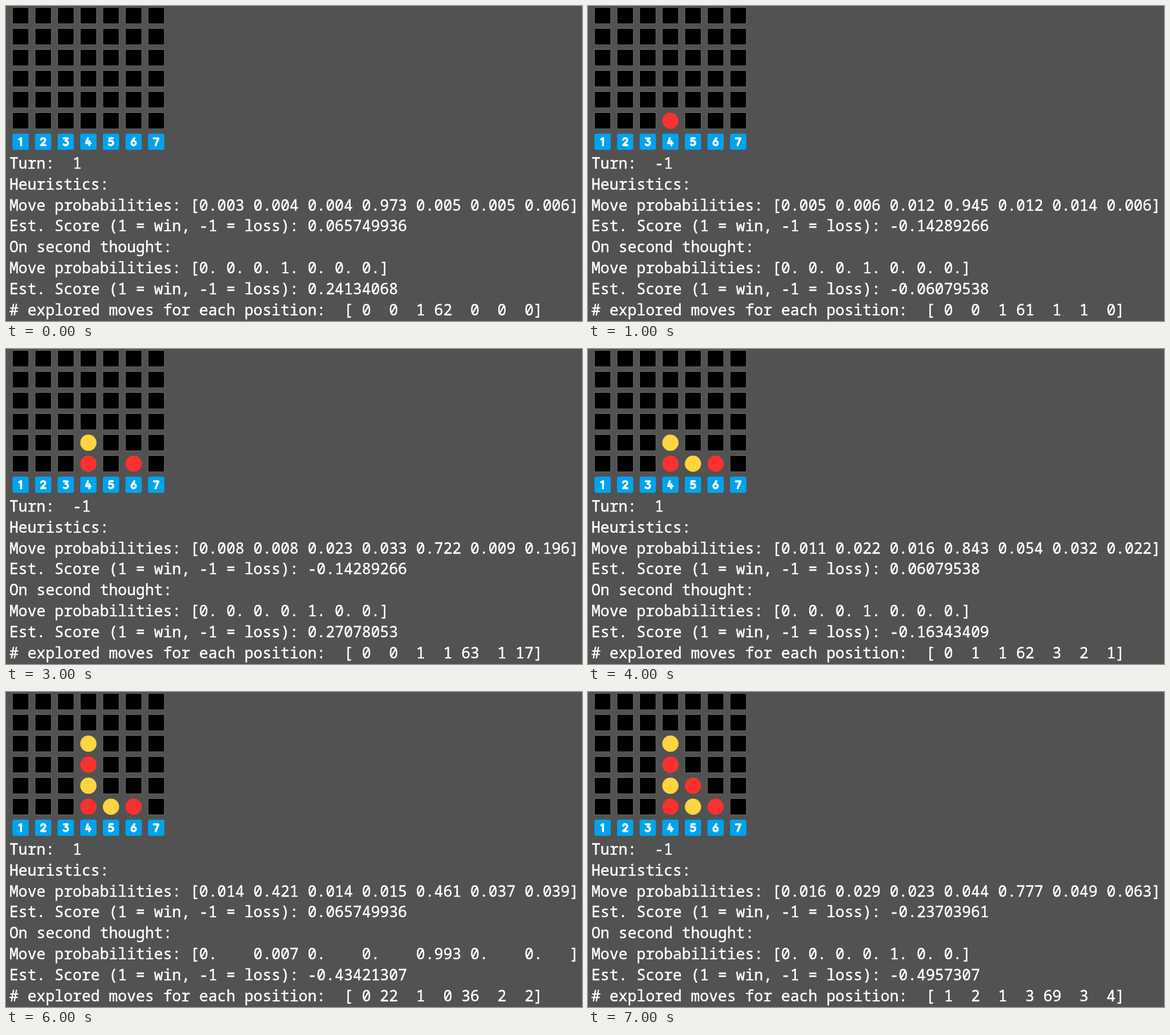
An HTML page for the animation above (8000 ms loop, 1011x554 px).

```html
<!DOCTYPE html>
<html lang="en">
<head>
<meta charset="utf-8">
<title>Four in a row</title>
<style>
  html, body { margin: 0; width: 100%; height: 100%; overflow: hidden; background: #525252; }
  svg { display: block; width: 100vw; height: 100vh; }
  text {
    font: 26.45px "Noto Sans Mono", "DejaVu Sans Mono", monospace;
    fill: #fff; stroke: #fff; stroke-width: 0.45; white-space: pre;
  }
  .digit { fill: none; stroke: #fff; stroke-width: 3.6; stroke-linecap: round; stroke-linejoin: round; }
</style>
</head>
<body>
<svg id="stage" viewBox="0 0 1011 554"></svg>
<script>
const COLS = 7, ROWS = 6, STEP = 1000;
const RED = '#fb312f', YELLOW = '#ffd43f', BLUE = '#00a3ee';
const colX = c => 25.6 + 39.67 * c;
const rowY = r => 16.9 + 36.97 * r;

const moves = [4, 4, 6, 5, 4, 4, 5];

// Per turn: prior, prior score, searched policy, searched score, visit counts
const turns = [
  ['0.003 0.004 0.004 0.973 0.005 0.005 0.006', '0.065749936',
   '0. 0. 0. 1. 0. 0. 0.', '0.24134068', ' 0  0  1 62  0  0  0'],
  ['0.005 0.006 0.012 0.945 0.012 0.014 0.006', '-0.14289266',
   '0. 0. 0. 1. 0. 0. 0.', '-0.06079538', ' 0  0  1 61  1  1  0'],
  ['0.005 0.005 0.029 0.018 0.483 0.454 0.006', '0.06079538',
   '0.    0.    0.    0.    0.091 0.909 0.   ', '-0.065749936', ' 0  0  1  1 27 34  0'],
  ['0.008 0.008 0.023 0.033 0.722 0.009 0.196', '-0.14289266',
   '0. 0. 0. 0. 1. 0. 0.', '0.27078053', ' 0  0  1  1 63  1 17'],
  ['0.011 0.022 0.016 0.843 0.054 0.032 0.022', '0.06079538',
   '0. 0. 0. 1. 0. 0. 0.', '-0.16343409', ' 0  1  1 62  3  2  1'],
  ['0.012 0.03  0.017 0.715 0.026 0.182 0.017', '-0.16343409',
   '0. 0. 0. 1. 0. 0. 0.', '0.030191822', ' 1  3  1 59  2 16  1'],
  ['0.014 0.421 0.014 0.015 0.461 0.037 0.039', '0.065749936',
   '0.    0.007 0.    0.    0.993 0.    0.   ', '-0.43421307', ' 0 22  1  0 36  2  2'],
  ['0.016 0.029 0.023 0.044 0.777 0.049 0.063', '-0.23703961',
   '0. 0. 0. 0. 1. 0. 0.', '-0.4957307', ' 1  2  1  3 69  3  4']
];

const digits = [
  'M-2.4-4.3L.8-6.2V6.2',
  'M-3.6-3.6C-3.4-7.2 3.8-7.4 3.6-2.6C3.4 0-1.5 3.5-3.6 6H4',
  'M-3.6-6H3.4L-.4-1.6C5.4-1.6 5 6.2-.4 6.2C-2 6.2-3.2 5.6-3.9 4.6',
  'M-1-6.2L-4 2.6H4M1.6-1.2V6.2',
  'M3.2-6.2H-2.6L-3.2-.8C0-2.2 4-1.4 3.8 2.2C3.6 6.4-1.6 7-3.6 4.8',
  'M1.4-6.2L-3 .4M-3.8 2.4a3.8 3.8 0 1 0 7.6 0a3.8 3.8 0 1 0-7.6 0',
  'M-4-6H3.8L-1 6.2'
];

const stage = document.getElementById('stage');

function add(tag, attrs) {
  const el = document.createElementNS('http://www.w3.org/2000/svg', tag);
  for (const key in attrs) el.setAttribute(key, attrs[key]);
  return stage.appendChild(el);
}

function square(c, r, size, attrs) {
  return add('rect', { x: colX(c) - size / 2, y: rowY(r) - size / 2,
    width: size, height: size, ...attrs });
}

// Board cells and column keys
const cells = [];
for (let c = 0; c < COLS; c++) {
  cells[c] = [];
  for (let r = 0; r < ROWS; r++)
    cells[c][r] = square(c, r, 28.6, { rx: 2, fill: '#000', stroke: '#747474', 'stroke-width': 0.9 });
  square(c, ROWS, 28.6, { rx: 3.4, fill: BLUE });
  add('path', { class: 'digit', d: digits[c], transform: `translate(${colX(c)} ${rowY(ROWS)})` });
}

// Discs stack from the bottom of each column
const heights = Array(COLS).fill(0);
const discs = moves.map((move, i) => {
  const c = move - 1, r = ROWS - 1 - heights[c]++;
  const disc = add('circle', { cx: colX(c), cy: rowY(r), r: 14.3, fill: i % 2 ? YELLOW : RED });
  return { disc, cell: cells[c][r] };
});

const lines = Array.from({ length: 8 }, (_, i) => add('text', { x: 6, y: 285.6 + 36.95 * i }));

const show = (el, on) => el.setAttribute('visibility', on ? 'visible' : 'hidden');

function render(n) {
  discs.forEach(({ disc, cell }, i) => {
    show(disc, i < n);
    show(cell, i >= n);
  });
  const [prior, score, policy, searched, visits] = turns[n];
  const estimate = value => `Est. Score (1 = win, -1 = loss): ${value}`;
  [
    `Turn:  ${n % 2 ? -1 : 1}`,
    'Heuristics:',
    `Move probabilities: [${prior}]`,
    estimate(score),
    'On second thought:',
    `Move probabilities: [${policy}]`,
    estimate(searched),
    `# explored moves for each position:  [${visits}]`
  ].forEach((line, i) => { lines[i].textContent = line; });
}

let shown = -1;
const start = performance.now();
function tick() {
  const n = Math.floor((performance.now() - start) / STEP) % turns.length;
  if (n !== shown) render(shown = n);
  requestAnimationFrame(tick);
}
tick();
</script>
</body>
</html>
```
